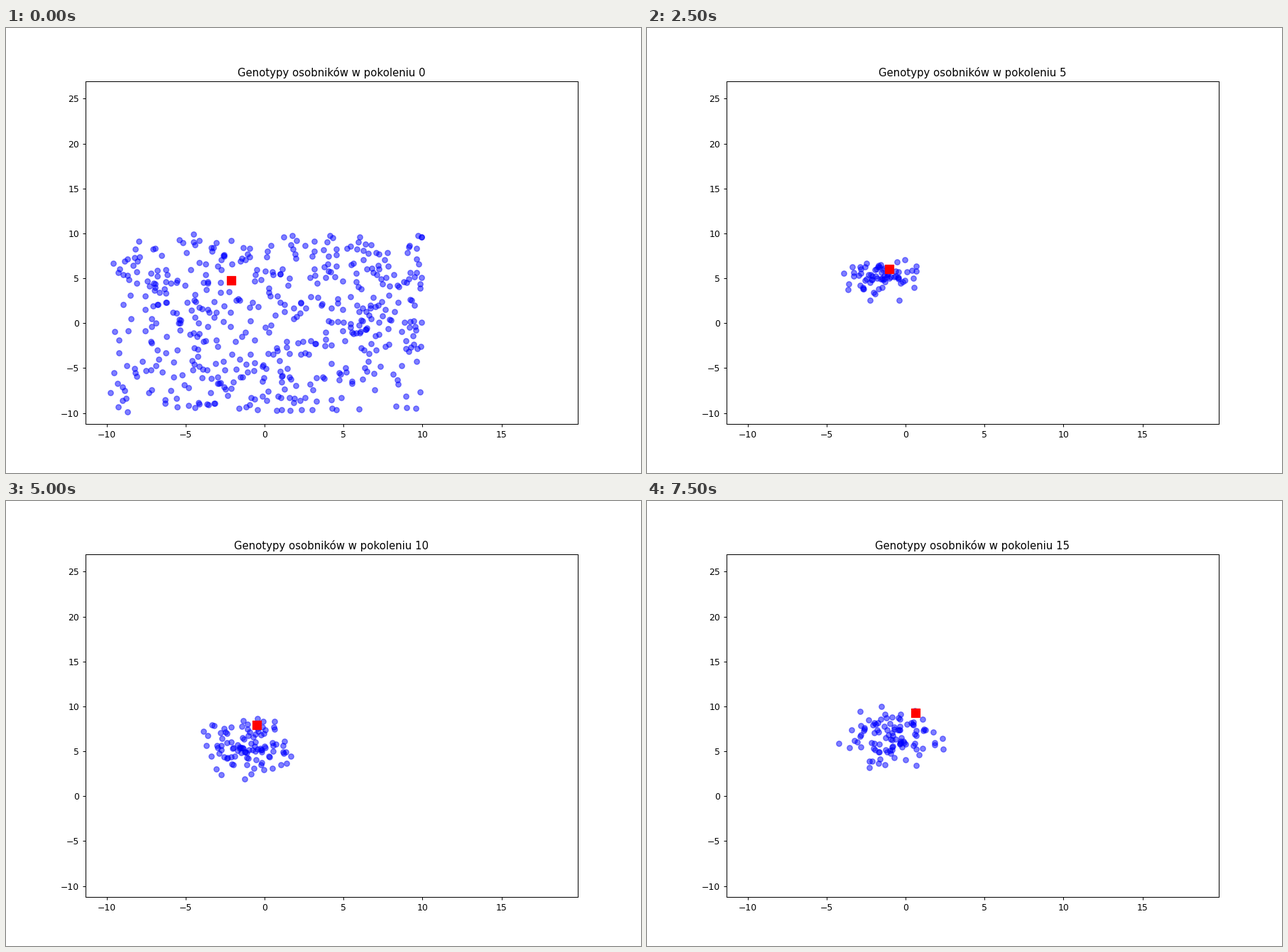
A matplotlib script for the animation above (8 s loop, 894 by 626 pixels).

```python
import numpy as np
import matplotlib.pyplot as plt
from matplotlib.animation import FuncAnimation

plt.rcParams["font.family"] = "DejaVu Sans"

WIDTH, HEIGHT, DPI = 894, 626, 89.4
GENERATIONS = 16
STEP_MS = 500
MAX_DISTINCT = 100

# Path of the best individual: generation, x, y
BEST_PATH = ([0, 3, 7, 10, 12, 15],
             [-2.12, -1.25, -0.85, -0.5, 0.3, 0.62],
             [4.75, 5.6, 6.5, 7.9, 8.5, 9.3])


def best_individual(generation):
    times, xs, ys = BEST_PATH
    return np.interp(generation, times, xs), np.interp(generation, times, ys)


def population(generation):
    """Uniform start, then a drifting cloud that widens towards a limit."""
    rng = np.random.default_rng(100 + generation)
    if generation == 0:
        return rng.uniform(-9.9, 10, (500, 2))
    count = min(MAX_DISTINCT, 14 * generation)
    mean = np.array([-1.85 + 0.065 * generation, 4.9 + 0.0078 * generation**2])
    spread = np.array([1.6, 1.75]) * (1 - np.exp(-generation / 5))
    cloud = rng.normal(size=(2 * count, 2))
    cloud = cloud[np.hypot(*cloud.T) < 2.6][:count]
    return mean + spread * cloud


# The small margin keeps the pixel size from being rounded down.
fig, ax = plt.subplots(figsize=((WIDTH + 0.01) / DPI, (HEIGHT + 0.01) / DPI), dpi=DPI)
ax.set(xlim=(-11.36, 19.82), ylim=(-11.235, 26.93),
       xticks=range(-10, 16, 5), yticks=range(-10, 26, 5))
individuals = ax.scatter([], [], color="blue", alpha=0.5)
best_mark = ax.scatter([], [], color="red", marker="s", s=100)
title = ax.set_title("")


def update(generation):
    individuals.set_offsets(population(generation))
    best_mark.set_offsets([best_individual(generation)])
    title.set_text(f"Genotypy osobników w pokoleniu {generation}")
    return individuals, best_mark, title


anim = FuncAnimation(fig, update, frames=GENERATIONS, interval=STEP_MS,
                     repeat=True, repeat_delay=0)
plt.show()
```
